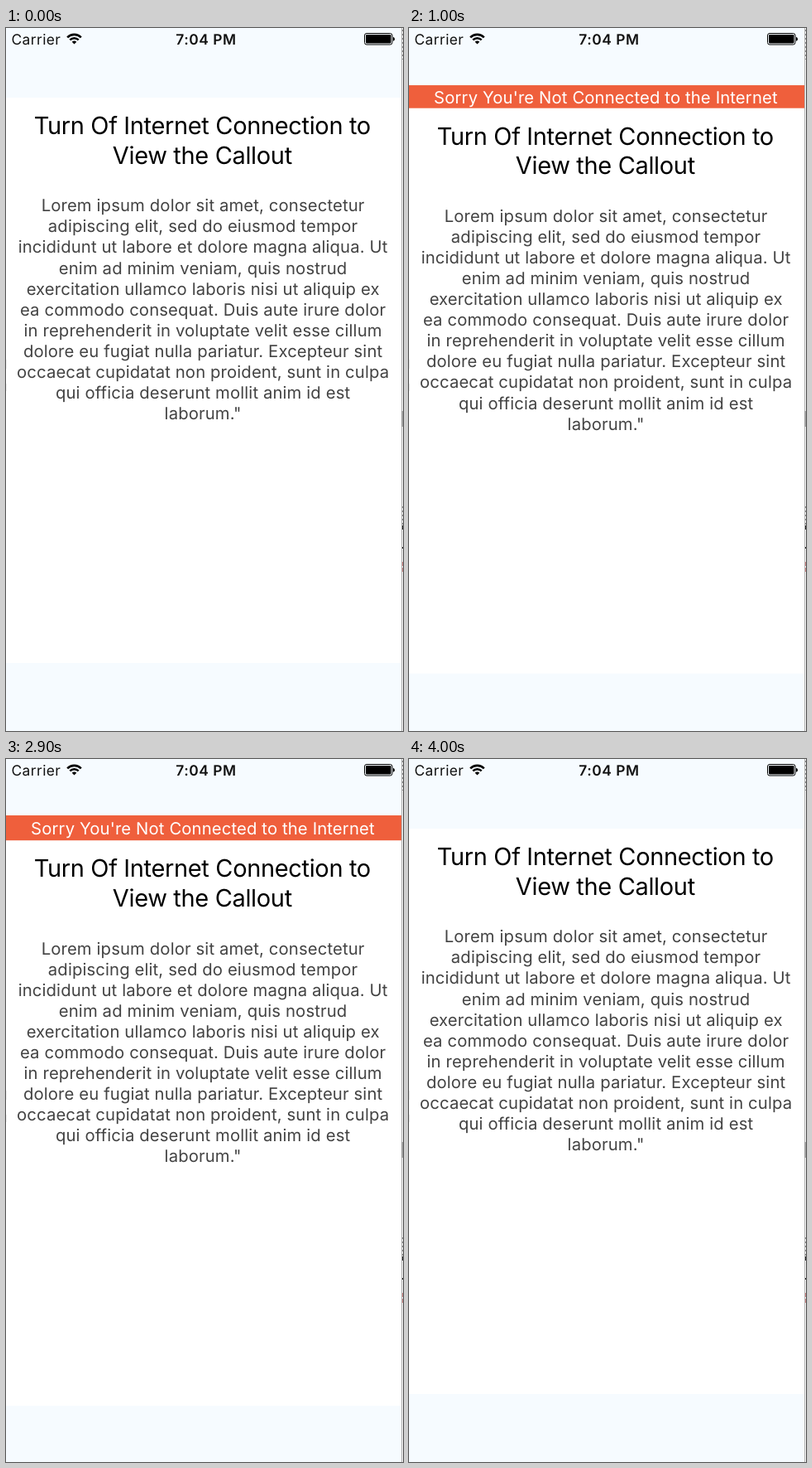
An HTML page that plays this animation: 480 px wide and 848 px high, repeating every 4.1 s.

```html
<!DOCTYPE html>
<html lang="en">
<head>
<meta charset="utf-8">
<title>Connection callout</title>
<style>
  @property --drop { syntax: "<length>"; inherits: true; initial-value: 0px; }

  html, body { margin: 0; width: 100%; height: 100%; overflow: hidden; background: #f6fbff; }

  svg {
    display: block;
    width: 480px;
    height: 848px;
    font-family: Inter, Roboto, "Liberation Sans", sans-serif;
    font-optical-sizing: none;
    text-rendering: geometricPrecision;
    animation: drop 4100ms step-end infinite;
  }

  /* The callout opens and closes in 100 ms steps along an ease-in-out curve. */
  @keyframes drop {
    0% { --drop: 0px; }
    19.51% { --drop: 3px; }
    21.95% { --drop: 7.7px; }
    24.39% { --drop: 12.7px; }
    26.82% { --drop: 17px; }
    29.26% { --drop: 18.3px; }
    31.7% { --drop: 18.5px; }
    70.73% { --drop: 14.2px; }
    73.17% { --drop: 9.4px; }
    75.6% { --drop: 5px; }
    78.04% { --drop: 1.5px; }
    80.48% { --drop: 0.2px; }
    82.92%, 100% { --drop: 0px; }
  }

  @keyframes show {
    0% { visibility: hidden; }
    19.51% { visibility: visible; }
    82.92%, 100% { visibility: hidden; }
  }

  .panel { transform: translateY(var(--drop)); }
  .banner { animation: show 4100ms step-end infinite; }
  .banner rect { transform: translateY(min(70px, 77.8px - .69 * var(--drop))); fill: #ef5f3c; }
  .banner text { transform: translateY(clamp(-1px, var(--drop) - 6px, 0px)); fill: #fff; }

  .status { font-size: 17.4px; letter-spacing: .024em; fill: #111; }
  .clock { font-weight: 600; letter-spacing: .03em; }
  .title { font-size: 29px; letter-spacing: -.012em; fill: #000; }
  .body { font-size: 20.3px; letter-spacing: .006em; fill: #434343; }
  .center { text-anchor: middle; }
</style>
</head>
<body>
<svg viewBox="0 0 480 848">
  <rect width="480" height="848" fill="#f6fbff"/>
  <rect y="92" width="2" height="47" fill="#eef7ff"/>

  <g class="banner">
    <rect width="478" height="40"/>
    <text class="body center" x="237.9" y="91.4">Sorry You're Not Connected to the Internet</text>
  </g>

  <g class="panel">
    <rect y="84" width="478" height="682" fill="#fff"/>
    <g class="title center">
      <text x="237.3" y="128">Turn Of Internet Connection to</text>
      <text x="237.3" y="163.5">View the Callout</text>
    </g>
    <g class="body center" transform="translate(238.1 221.4)">
      <text>Lorem ipsum dolor sit amet, consectetur</text>
      <text y="25.05">adipiscing elit, sed do eiusmod tempor</text>
      <text y="50.1">incididunt ut labore et dolore magna aliqua. Ut</text>
      <text y="75.15">enim ad minim veniam, quis nostrud</text>
      <text y="100.2">exercitation ullamco laboris nisi ut aliquip ex</text>
      <text y="125.25">ea commodo consequat. Duis aute irure dolor</text>
      <text y="150.3">in reprehenderit in voluptate velit esse cillum</text>
      <text y="175.35">dolore eu fugiat nulla pariatur. Excepteur sint</text>
      <text y="200.4">occaecat cupidatat non proident, sunt in culpa</text>
      <text y="225.45">qui officia deserunt mollit anim id est</text>
      <text y="250.5">laborum."</text>
    </g>
  </g>

  <!-- status bar -->
  <text class="status" x="6.5" y="20.1">Carrier</text>
  <g transform="translate(82.5 19.6)" fill="none" stroke="#000">
    <path d="M-8.3 -8.3A11.7 11.7 0 0 1 8.3 -8.3" stroke-width="2.6"/>
    <path d="M-5.2 -5.2A7.3 7.3 0 0 1 5.2 -5.2" stroke-width="2.4"/>
    <path d="M0 0L-2.8 -2.8A4 4 0 0 1 2.8 -2.8Z" fill="#000" stroke="none"/>
  </g>
  <text class="status clock center" x="242" y="20.1">7:04 PM</text>
  <rect x="433.5" y="6.5" width="33.5" height="13.5" rx="2.5" fill="none" stroke="#000"/>
  <rect x="435" y="8" width="30.5" height="10.5" rx="1.2"/>
  <path d="M468 10.8Q470 11.3 470 13.3T468 15.8Z"/>

  <!-- window edges -->
  <path d="M0 400v11M0 429v9" stroke="#ddd"/>
  <rect x="479" width="1" height="848" fill="#f4f4f4"/>
  <rect x="478" width="1" height="848" fill="#b4b4b4"/>
  <rect x="478" y="462" width="2" height="19" fill="#a4a4a4"/>
  <path d="M479.5 2v36M479.5 577v22" stroke="#888" stroke-dasharray="2 3"/>
  <path d="M479.5 600v5M479.5 626v2" stroke="#222"/>
  <path d="M479.5 644v12" stroke="#c98080" stroke-dasharray="5 2"/>
</svg>
</body>
</html>
```
